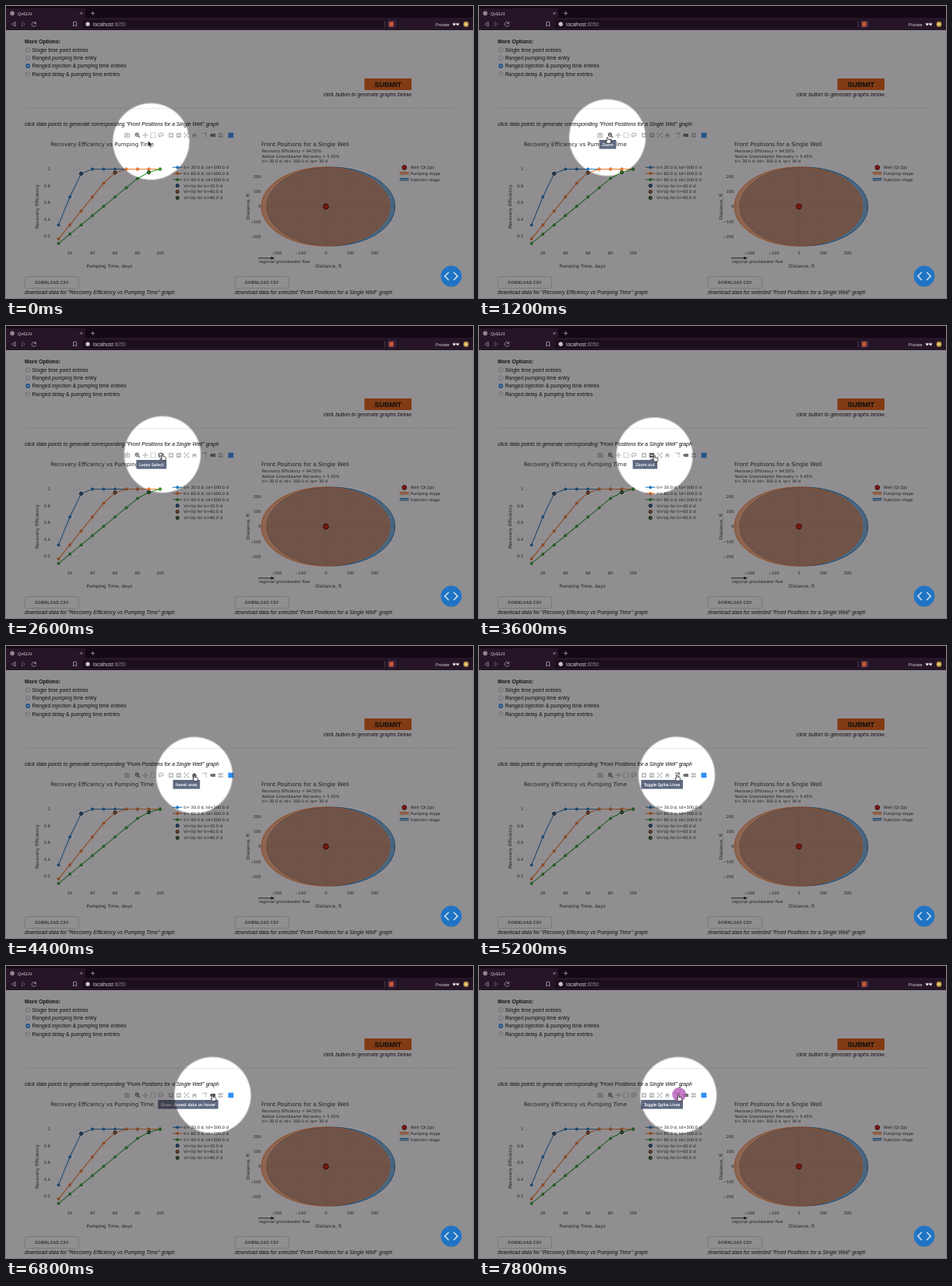
These frames come from a looping animation (600 by 375 pixels, 8000 ms). An HTML page:

```html
<!DOCTYPE html>
<html lang="en">
<head>
<meta charset="utf-8">
<title>QvELN</title>
<style>
html, body { margin: 0; width: 100%; height: 100%; overflow: hidden; background: #908e91; }
svg { display: block; width: 100vw; height: 100vh; }
text { font-family: "Liberation Sans", Arial, sans-serif; fill: #0c0c0c; white-space: pre; }
.plot text { font-family: "DejaVu Sans", Verdana, sans-serif; fill: #262626; }
.it { font-style: italic; }
.b { font-weight: bold; }
.mid { text-anchor: middle; }
.end { text-anchor: end; }
.icon { fill: none; stroke: #444; stroke-width: 1.2; opacity: .36; }
.icon .solid { fill: #444; stroke: none; }
.icon.active { opacity: .75; }
.icon.hover { opacity: .9; }
.chrome text { fill: #d6d0d8; }
.chrome path { fill: none; stroke: #aaa2ac; stroke-width: .8; }
</style>
</head>
<body>
<svg id="stage" viewBox="0 0 600 375" xmlns="http://www.w3.org/2000/svg"></svg>
<script>
const BLUE = '#2079bd', ORANGE = '#f5782a', GREEN = '#2ca02c';

const text = (x, y, size, str, cls = '', extra = '') =>
  `<text x="${x}" y="${y}" font-size="${size}" class="${cls}" ${extra}>${str}</text>`;
const dot = (x, y, r, fill, extra = '') =>
  `<circle cx="${x}" cy="${y}" r="${r}" fill="${fill}" ${extra}/>`;
const rect = (x, y, w, h, fill, extra = '') =>
  `<rect x="${x}" y="${y}" width="${w}" height="${h}" fill="${fill}" ${extra}/>`;
const line = (x1, y1, x2, y2, color, width = 1) =>
  `<path d="M${x1} ${y1}L${x2} ${y2}" stroke="${color}" stroke-width="${width}" fill="none"/>`;
const turned = (x, y, size, str) =>
  text(0, 0, size, str, 'mid', `transform="translate(${x} ${y}) rotate(-90)"`);

function options() {
  const labels = ['Single time point entries', 'Ranged pumping time entry',
    'Ranged injection &amp; pumping time entries', 'Ranged delay &amp; pumping time entries'];
  return text(24, 48.2, 6.8, 'More Options:', 'b') + labels.map((label, i) => {
    const y = 56.2 + i * 10.35;
    const radio = i === 2
      ? dot(28, y, 2.9, '#1a86ff') + dot(28, y, 1.1, '#fff')
      : dot(28, y, 2.6, '#fff', 'stroke="#999" stroke-width=".6"');
    return radio + text(33.5, y + 2.4, 6.75, label);
  }).join('');
}

function csvButton(x, caption) {
  return rect(x + .3, 347.6, 69.2, 14.8, 'none', 'rx="1.6" stroke="#b5b5b5" stroke-width=".6"') +
    text(x + 34.9, 356.8, 4.6, 'DOWNLOAD CSV', 'b mid', 'letter-spacing=".42" style="fill:#444"') +
    text(x, 370.2, 6.76, caption, 'it');
}

function efficiencyPlot() {
  const px = days => 53 + 1.45 * days, py = v => 317 - 107.5 * v;
  const series = [[30, BLUE, .9455], [60, ORANGE, .957], [90, GREEN, .962]];
  let out = text(57.5, 180.2, 7.1, 'Recovery Efficiency vs Pumping Time');
  for (let d = 20; d <= 100; d += 20)
    out += line(px(d), 203, px(d), 311, '#eee', .5) + text(px(d), 319, 5.1, d, 'mid');
  for (let i = 1; i <= 5; i++)
    out += line(60, py(i / 5), 205, py(i / 5), '#eee', .5) + text(57, py(i / 5) + 1.9, 5.1, i / 5, 'end');
  out += text(132.8, 336, 5.85, 'Pumping Time, days', 'mid') + turned(42, 257.5, 5.85, 'Recovery Efficiency');
  let rings = '';
  series.forEach(([ti, color, peak], i) => {
    const pts = Array.from({ length: 10 }, (_, k) => {
      const d = 10 * (k + 1);
      return [px(d), py(d === ti ? peak : Math.min(1, d / ti))];
    });
    out += `<polyline points="${pts.join(' ')}" fill="none" stroke="${color}" stroke-width="1.1"/>`;
    out += pts.map(([x, y]) => dot(x, y, 2, color)).join('');
    const ring = (x, y) => dot(x, y, 2, color, 'stroke="#111" stroke-width="1"');
    rings += ring(px(ti), py(peak));
    const y = 207.2 + i * 7.85, y2 = y + 23.5;
    out += line(214, y, 226.5, y, color, 1.1) + dot(220.3, y, 2, color) +
      text(228.3, y + 1.9, 5.1, `ti= ${ti}.0 d, td=300.0 d`);
    rings += ring(220.3, y2) + text(228.3, y2 + 1.9, 5.1, `Vi=Vp for ti=${ti}.0 d`);
  });
  return out + rings;
}

function frontPlot() {
  const ellipse = (cx, color) =>
    `<ellipse cx="${cx}" cy="257.5" rx="82.3" ry="50.5" fill="${color}" fill-opacity=".58" stroke="${color}" stroke-width="1"/>`;
  const well = (x, y, r) => dot(x, y, r, '#d01808', 'stroke="#300" stroke-width=".8"');
  let out = text(328, 180.2, 7.18, 'Front Positions for a Single Well') +
    text(328.8, 188.2, 5.07, 'Recovery Efficiency = 94.55%') +
    text(328.8, 194.7, 5.07, 'Native Groundwater Recovery = 5.45%') +
    text(328.8, 201, 5.07, 'ti= 30.0 d, td= 300.0 d, tp= 30 d');
  for (let v = -200; v <= 200; v += 100) {
    const label = String(v).replace('-', '−'), x = 411 + v * .313, y = 257.5 - v * .191;
    out += line(x, 206, x, 309, '#eee', .5) + text(x - (v < 0 ? 1 : 0), 319, 5.1, label, 'mid') +
      line(331, y, 500, y, '#eee', .5) + text(327.5, y + 1.9, 5.1, label, 'end');
  }
  out += line(411, 206, 411, 309, '#888', .5) + line(328, 257.5, 501, 257.5, '#888', .5) +
    ellipse(417.4, BLUE) + ellipse(410.4, ORANGE) + well(411, 257.5, 3.5) +
    text(414.5, 336, 5.85, 'Distance, ft', 'mid') + turned(312.5, 257.5, 5.85, 'Distance, ft') +
    line(324, 323.8, 342, 323.8, '#111', .9) + '<path d="M340.5 321.8l4.5 2-4.5 2z" fill="#111"/>' +
    text(325, 329.8, 5, 'regional groundwater flow') +
    well(511.8, 207.4, 2.9) + text(519.8, 209.3, 5.1, 'Well (QI,Qp)');
  [['Pumping stage', ORANGE], ['Injection stage', BLUE]].forEach(([label, color], i) => {
    const y = 215.3 + i * 7.8;
    out += rect(505.8, y - 1.7, 11.8, 3.4, color, 'fill-opacity=".58"') +
      line(505.8, y - 1.7, 517.6, y - 1.7, color) + text(519.8, y + 1.9, 5.1, label);
  });
  return out;
}

// Toolbar: x centre, tooltip, glyph drawn around the origin
const tools = [
  [155.5, 'Download plot as a png', '<path d="M-3-1.8h1.5l.8-1h1.4l.8 1H3V2.5H-3z"/><circle r="1.1"/>'],
  [169, 'Zoom', '<circle cx="-.6" cy="-.7" r="2.1"/><path d="M1 1l2 2M-1.6-.7h2M-.6-1.7v2"/>'],
  [179, 'Pan', '<path d="M-3 0h6M0-3v6"/><path class="solid" d="M0-3.8l1.3 1.5h-2.6zM0 3.8l1.3-1.5h-2.6zM-3.8 0l1.5 1.3v-2.6zM3.8 0L2.3 1.3v-2.6z"/>'],
  [189, 'Box Select', '<path d="M-3-3H3V3H-3z" stroke-dasharray="1.2 .6"/>'],
  [199, 'Lasso Select', '<ellipse cy="-.8" rx="3" ry="1.9"/><path d="M-1.6 .8q-1.4 1 0 2.2"/>'],
  [212, 'Zoom in', '<path class="solid" fill-rule="evenodd" d="M-3-3H3V3H-3zM-.5-2V-.5H-2V.5H-.5V2H.5V.5H2V-.5H.5V-2z"/>'],
  [222, 'Zoom out', '<path class="solid" fill-rule="evenodd" d="M-3-3H3V3H-3zM-2-.5V.5H2V-.5z"/>'],
  [232, 'Autoscale', '<path d="M-3-3L3 3M3-3L-3 3M-3-1.5V-3h1.5M3 1.5V3H1.5M1.5-3H3v1.5M-1.5 3H-3V1.5" stroke-width=".9"/>'],
  [242, 'Reset axes', '<path class="solid" d="M0-3L3.3 0H2.4V3H.8V1H-.8V3h-1.6V0h-.9z"/>'],
  [254.8, 'Toggle Spike Lines', '<path d="M-3-2.6H2M2-2.6V3" stroke-dasharray="1.3 .5"/><path class="solid" d="M1-3.5h2v2H1z"/>'],
  [265.5, 'Show closest data on hover', '<path class="solid" d="M-3.6 0l1.7-1.9h5.4v3.8h-5.4z"/>'],
  [275.5, 'Compare data on hover', '<path class="solid" d="M-3.4-1.6l1-1.2H3.3v2.4h-5.7zM-3.4 1.6l1-1.2H3.3v2.4h-5.7z"/>']
];
const toolbar = tools.map(([x, , glyph], i) =>
  `<g class="icon ${i === 1 || i === 10 ? 'active' : ''}" transform="translate(${x} 166)">${glyph}</g>`).join('') +
  rect(285.5, 162.7, 6.8, 6.6, '#2f8ff5');

const chrome = `<g class="chrome">` +
  rect(0, 0, 600, 31, '#140716') + rect(0, 3, 102, 13, '#261527') + rect(0, 15, 600, 16, '#261527') +
  rect(98, 18, 405, 10.5, '#1b0e1d', 'rx="1.5"') +
  dot(8, 9.4, 2.8, '#8d858e') + text(15, 11.7, 5.6, 'QvELN') +
  `<path d="M95.3 7.8l3 3m0-3l-3 3M109 9.3h5m-2.5-2.5v5M12 20.5v5.5l-4.2-2.7z"/>
   <path d="M20.5 20.5v5.5l4.2-2.7z" opacity=".45"/>
   <path d="M38 22a2.7 2.7 0 1 0 .4 2M38.4 20.3v2.2h-2.2M86.5 20.5h4v5.5l-2-1.5-2 1.5z"/>
   <path d="M487 19v8.5" opacity=".5"/>` +
  dot(105, 23.3, 2.7, '#c9c2ca') + line(105, 22.8, 105, 25, '#1c0d1d', .8) +
  text(112, 25.6, 6.5, 'localhost<tspan fill="#8d858e">:8050</tspan>') +
  rect(490, 18.3, 11.5, 10, '#35243a') + rect(492.2, 20.2, 5.6, 6.2, '#c65733') +
  text(552, 25.6, 5.7, 'Private') + dot(575.8, 23.5, 1.7, '#d8d2d8') + dot(580.2, 23.5, 1.7, '#d8d2d8') +
  line(573.5, 22.3, 582.5, 22.3, '#d8d2d8', .8) + dot(591, 23.4, 3.3, '#c9a545') + dot(591, 23.4, 1.2, '#f0e3b4') +
  '</g>';

const stage = document.getElementById('stage');
stage.innerHTML = `
<defs><radialGradient id="spot" gradientUnits="userSpaceOnUse" cx="0" cy="0" r="50.2">
  <stop offset=".955" stop-color="#19141a" stop-opacity="0"/><stop offset="1" stop-color="#19141a" stop-opacity=".48"/>
</radialGradient></defs>` +
  rect(0, 0, 600, 375, '#fff') + options() +
  text(408, 116.2, 6.82, 'click button to generate graphs below', 'it') +
  line(24, 131.5, 577, 131.5, '#dcdcdc', .6) +
  text(24, 154.2, 6.74, 'click data points to generate corresponding "Front Positions for a Single Well" graph', 'it') +
  csvButton(24, 'download data for "Recovery Efficiency vs Pumping Time" graph') +
  csvButton(294, 'download data for selected "Front Positions for a Single Well" graph') +
  `<g class="plot">${efficiencyPlot()}${frontPlot()}${toolbar}
    <g id="tip"><path fill="#5e6880"/><text y="179.8" font-size="5.1" text-anchor="middle" style="fill:#fff" stroke="#fff" stroke-width=".12"></text></g>
  </g>
  <rect id="shade" x="-600" y="-400" width="1200" height="800" fill="url(#spot)"/>` +
  rect(460.5, 93, 60.5, 15, '#803b14', 'rx="1"') +
  text(490.8, 104, 9, 'SUBMIT', 'b mid') +
  dot(572, 347, 13.4, '#2074c4') +
  '<path d="M568.8 342l-5 5 5 5M575.2 342l5 5-5 5" fill="none" stroke="#dbe4ec" stroke-width="1.5"/>' + chrome +
  `<g id="pointer">
    <circle id="press" cx="1" cy="-1" r="9" fill="#b45ab4" fill-opacity=".8"/>
    <path id="arrow" d="M-3.8-1v7.6l1.7-1.6 1.2 2.8 1.3-.6-1.2-2.6h2.4z" fill="#111" stroke="#fff" stroke-width=".5"/>
    <path id="hand" d="M-.7 0q.9-1 1.6 0v2.4l3 .7q.9.4.6 1.6l-.7 2.8h-3.9l-2.2-3q-.1-1.2 1.6 0z" fill="#fff" stroke="#111" stroke-width=".7"/>
  </g>`;

// Pointer path: time, x, y
const path = [
  [0, 186.4, 174], [200, 186, 174], [1000, 165.5, 169.3], [1200, 165, 169], [1500, 168, 168],
  [1800, 179, 167], [2200, 190, 166], [2600, 201, 165], [3000, 212, 166], [3600, 225.5, 166.6],
  [4000, 232, 166.5], [4400, 242, 166], [5000, 253.5, 165.7], [5200, 254, 165.7], [5600, 265, 166],
  [6000, 273.5, 166], [6400, 274, 166], [7200, 257, 166], [8000, 256, 166]
];
const $ = id => document.getElementById(id);
const [shade, tip, pointer, press, arrow, hand] =
  ['shade', 'tip', 'pointer', 'press', 'arrow', 'hand'].map($);
const tipBox = tip.querySelector('path'), tipText = tip.querySelector('text');
const icons = [...document.querySelectorAll('.icon')];
const show = (el, on) => el.setAttribute('visibility', on ? 'visible' : 'hidden');

function locate(t) {
  const i = path.findIndex(p => p[0] > t), a = path[i - 1], b = path[i];
  const k = (t - a[0]) / (b[0] - a[0]), e = k * k * (3 - 2 * k);
  return [a[1] + (b[1] - a[1]) * e, a[2] + (b[2] - a[2]) * e];
}

function draw(t) {
  const [x, y] = locate(t);
  let hit = -1;
  if (y < 171.5) tools.forEach((tool, i) => {
    if (hit < 0 || Math.abs(tool[0] - x) < Math.abs(tools[hit][0] - x)) hit = i;
  });
  shade.setAttribute('transform', `translate(${x} ${y})`);
  pointer.setAttribute('transform', `translate(${x} ${y})`);
  icons.forEach((icon, i) => icon.classList.toggle('hover', i === hit));
  show(tip, hit >= 0);
  show(hand, hit >= 0);
  show(arrow, hit < 0);
  show(press, t >= 7800);
  if (hit < 0) return;
  const [cx, label] = tools[hit];
  tipText.textContent = label;
  const right = cx + 7.2, width = tipText.getComputedTextLength() + 7;
  tipText.setAttribute('x', right - width / 2);
  tipBox.setAttribute('d', `M${right - width} 172H${right}V183.4H${right - width}zM${cx - 2} 172l2-2 2 2z`);
}

let start;
function tick(now) {
  start ??= now;
  draw(Math.floor((now - start) % 8000 / 200) * 200);
  requestAnimationFrame(tick);
}
draw(0);
requestAnimationFrame(tick);
</script>
</body>
</html>
```
